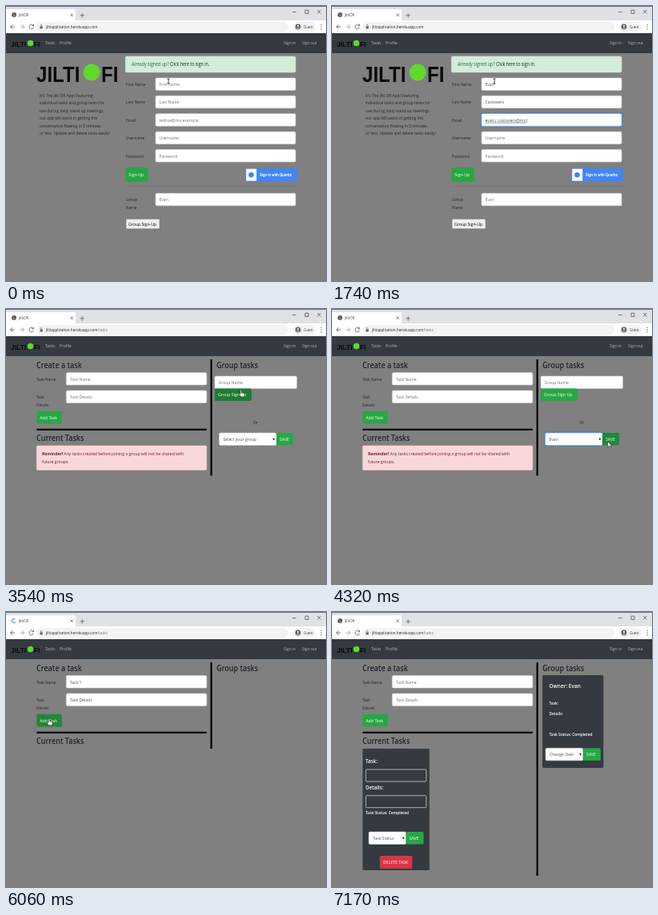
Animation, 400 px wide and 344 px high, one loop 7200 ms. Source, as an HTML page:

```html
<!DOCTYPE html>
<html lang="en">
<head>
<meta charset="utf-8">
<title>JiltiOfi</title>
<style>
  html, body { margin: 0; width: 100%; height: 100%; overflow: hidden; background: #808080; }
  svg { display: block; width: 100vw; height: 100vh; }
  text { font-family: "Open Sans", "Noto Sans", sans-serif; white-space: pre; }
</style>
</head>
<body>
<svg viewBox="0 0 400 344" preserveAspectRatio="none">
  <g id="chrome"></g>
  <g id="tab"></g>
  <g id="page"></g>
  <g id="pointer"></g>
</svg>
<script>
const LOOP = 7200;
const SQUEEZE = 0.86;
const INK = '#212529', GREEN = '#28a745', DARK = '#343a40', MUTED = '#6c757d';

// Drawing helpers: each returns SVG markup
const rect = (x, y, w, h, fill, extra = '') =>
  `<rect x="${x}" y="${y}" width="${w}" height="${h}" fill="${fill}" ${extra}/>`;
const line = (d, color, width = 0.8) =>
  `<path d="${d}" fill="none" stroke="${color}" stroke-width="${width}"/>`;
const text = (x, cy, str, { size = 5.9, fill = INK, weight = 400, extra = '' } = {}) =>
  `<text transform="translate(${x} ${cy + size * 0.34}) scale(${SQUEEZE} 1)"
    font-size="${size}" font-weight="${weight}" fill="${fill}" ${extra}>${str}</text>`;
const label = (x, cy, str) => text(x, cy, str, { size: 5.6 });
const heading = (x, cy, str) => text(x, cy, str, { size: 10.5, weight: 600 });
const button = (x, y, w, h, str, fill = GREEN, pad = 4) =>
  rect(x, y, w, h, fill, 'rx="1.5"') +
  text(x + pad, y + h / 2, str, { size: 6.1, fill: '#fff', weight: 500 });

function box(x, y, w, h, focus) {
  const glow = focus
    ? rect(x - 0.8, y - 0.8, w + 1.6, h + 1.6, 'none', 'rx="2" stroke="#007bff" stroke-opacity=".45" stroke-width="1.2"')
    : '';
  return glow + rect(x, y, w, h, '#fff', `rx="1.6" stroke="${focus ? '#80bdff' : '#ced4da'}" stroke-width=".6"`);
}

function input(x, y, w, hint, value = '', focus = false, decor = '') {
  const caret = value && focus ? '<tspan fill="#000" text-decoration="none">|</tspan>' : '';
  return box(x, y, w, 15.5, focus) +
    text(x + 4.5, y + 8, value ? `<tspan ${decor}>${value}</tspan>${caret}` : hint,
      { fill: value ? '#495057' : MUTED });
}

const select = (x, y, w, str, focus) =>
  box(x, y, w, 15.5, focus) +
  text(x + 5, y + 8, str, { fill: '#495057' }) +
  `<path d="M${x + w - 4.6} ${y + 6.8}h2.8l-1.4 2.6z" fill="#222"/>`;

const popup = (x, y, w, rows, active, step = 12) =>
  rect(x, y, w, rows.length * step, '#fff', 'stroke="#767676" stroke-width=".5"') +
  rows.map((row, i) =>
    (i === active ? rect(x, y + i * step, w, step, '#1e90ff') : '') +
    text(x + 5, y + (i + 0.5) * step, row, { fill: i === active ? '#fff' : '#495057' })).join('');

const wordmark = () => {
  const style = { size: 28, weight: 700, fill: '#0b0b0b', extra: 'style="font-family:\'Liberation Sans\',sans-serif"' };
  return text(38, 85, 'JILTI', style) +
    '<circle cx="107" cy="83" r="10.5" fill="#5fd92c"/>' +
    text(119, 85, 'FI', style);
};

// Timing helpers
const within = (t, a, b) => t >= a && t < b;
const typed = (str, t, a, b) =>
  str.slice(0, Math.max(0, Math.min(str.length, Math.floor((t - a) / (b - a) * str.length))));
const LOADS = [[3060, 3300], [4530, 4800], [6030, 6210], [6810, 7080]];
const PAGE = { tasks: 3120, joined: 4590, added: 6090, saved: 6870 };

// Form fields: row y, label, hint, value, typing start and end
const FIELDS = [
  [90, 'First Name', 'First Name', 'Evan', 150, 390],
  [112.3, 'Last Name', 'Last Name', 'Castovero', 480, 930],
  [134.7, 'Email', 'tedroe@mx.example', 'evan.r.castovero@mx.example', 1020, 2010],
  [157.2, 'Username', 'Username', 'ecastovero1', 2040, 2340],
  [179.6, 'Password', 'Password', 'password', 2400, 2700]
];
const INTRO = [
  "It's The Jilti Ofi App! Featuring", 'individual tasks and group tasks for',
  'use during daily stand up meetings,', 'our app will assist in getting the',
  'conversation flowing in 5 minutes', 'or less. Update and delete tasks easily!'
];

function browser() {
  const grey = '#5f6368';
  const nav = (x, str) => text(x, 46.5, str, { size: 5.8, fill: '#b3b6b9' });
  return rect(0, 0, 400, 19, '#dee1e6') + rect(0, 0, 400, 1, '#6f6690') +
    '<path d="M0 19V4H85q2 0 2 2V19z" fill="#fff"/>' +
    text(16, 11.3, 'JiltiOfi', { size: 5.2, fill: '#3c4043' }) +
    line('M80.5 9.5l3.4 3.6m0-3.6l-3.4 3.6M92.5 11.8h5.4m-2.7-2.8v5.6', grey) +
    line('M358 7.5h4.5M374 5.2h4v4.2h-4zM389.3 5l4 4.4m0-4.4l-4 4.4', '#444', 0.7) +
    rect(0, 18, 400, 16, '#fff') +
    line('M10.8 26H5.6m2.6-2.8L5.6 26l2.6 2.8', grey, 0.9) +
    line('M17.5 26h5.2m-2.6-2.8l2.6 2.8-2.6 2.8', '#a5a8ab', 0.9) +
    line('M33.8 24.2a2.7 2.9 0 1 0 .5 2.5M34.4 22.6v2.2h-2.2', grey, 0.9) +
    rect(38, 20, 315, 12, '#f1f3f4', 'rx="6"') +
    rect(42.5, 25.4, 3.2, 3, grey) + line('M43.2 25.5v-1.2a.9 1 0 0 1 1.8 0v1.2', grey, 0.6) +
    rect(359, 20, 28, 12, '#f1f3f4', 'rx="6"') +
    `<circle cx="365" cy="26" r="3.4" fill="${grey}"/><circle cx="365" cy="25" r="1.1" fill="#fff"/>` +
    '<path d="M363 28.3q2-2.2 4 0z" fill="#fff"/>' +
    text(372, 26, 'Guest', { size: 5, fill: '#3c4043' }) +
    [23.2, 26, 28.8].map(y => `<circle cx="394" cy="${y}" r=".7" fill="${grey}"/>`).join('') +
    rect(0, 34, 400, 25, DARK) + rect(0, 59, 400, 285, '#808080') +
    `<g transform="translate(-7.5 17) scale(.355)">${wordmark()}</g>` +
    nav(49, 'Tasks') + nav(67, 'Profile') + nav(347, 'Sign in') + nav(370, 'Sign out');
}

function tabState(t) {
  const busy = LOADS.some(([a, b]) => within(t, a, b));
  const icon = busy
    ? `<circle cx="10" cy="11" r="2.6" fill="none" stroke="#1a73e8" stroke-width=".9"
        stroke-dasharray="11 6" transform="rotate(${t * 0.6 % 360} 10 11)"/>`
    : '<circle cx="10" cy="11" r="2.9" fill="#4a4d51"/>' + line('M8 9.6q1.5 1 2.2-.4M9 13.2q.4-1.6 2.6-1.2', '#fff', 0.6);
  const path = t >= PAGE.tasks ? '<tspan fill="#777">/tasks</tspan>' : '';
  return icon + text(50, 26, 'jiltiapplication.herokuapp.com' + path, { size: 5.3 });
}

function signUp(t) {
  let out = wordmark() +
    INTRO.map((row, i) => text(42, 112 + i * 9.4, row, { size: 5.7 })).join('') +
    rect(149.3, 63, 212.7, 20, '#d4edda', 'rx="1.6" stroke="#c3e6cb" stroke-width=".6"') +
    text(157, 73, 'Already signed up? <tspan fill="#0b2e13" font-weight="500">Click here to sign in.</tspan>',
      { size: 6.2, fill: '#2d6a3b' });
  FIELDS.forEach(([y, name, hint, value, a, b], i) => {
    const next = FIELDS[i + 1] ? FIELDS[i + 1][4] - 60 : 3030;
    const focus = within(t, a - 60, next);
    const decor = i === 2 && focus ? 'text-decoration="underline"' : '';
    out += label(150, y + 8, name) + input(187, y, 175, hint, typed(value, t, a, b), focus, decor);
  });
  return out + button(149.3, 202, 28.5, 18, 'Sign-Up', within(t, 2970, 3120) ? '#218838' : GREEN) +
    rect(299.5, 203, 64.5, 16.5, '#4285f4', 'rx=".8"') + rect(300.2, 203.7, 13, 15, '#fff') +
    '<circle cx="306.5" cy="211.2" r="3.3" fill="#4285f4"/>' +
    text(317, 211.2, 'Sign in with Quorbo', { size: 5.3, fill: '#fff', weight: 700, extra: 'style="font-family:Roboto,sans-serif"' }) +
    rect(149.3, 225.3, 214.7, 0.6, '#737373') +
    label(150, 242, 'Group') + label(150, 252, 'Name') + input(187, 234.3, 175, 'Evan') +
    rect(150, 266.3, 42, 12.5, '#efefef', 'stroke="#767676" stroke-width=".6"') +
    text(153, 272.6, 'Group Sign-Up', { size: 6, fill: '#000' });
}

function joinForm(t) {
  const hover = within(t, 3450, 3750);
  const open = within(t, 3870, 4140);
  const chosen = t >= 4140;
  return rect(38.3, 171, 212.5, 30.5, '#f8d7da', 'rx="1.6" stroke="#f5c6cb" stroke-width=".6"') +
    text(45, 181.3, '<tspan font-weight="700">Reminder!</tspan> Any tasks created before joining a group will not be shared with', { fill: '#721c24' }) +
    text(45, 190.7, 'future groups.', { fill: '#721c24' }) +
    input(261, 84, 102.5, 'Group Name') +
    button(261, 99.5, 46, 15.5, 'Group Sign Up', hover ? '#1e7e34' : GREEN) +
    text(309, 142, 'Or', { weight: 500 }) +
    select(266.5, 155, 71.5, chosen ? 'Evan' : 'Select your group', within(t, 3870, 4380)) +
    button(338, 155, 21, 15.5, 'SAVE', within(t, 4320, 4590) ? '#218838' : GREEN) +
    (open ? popup(266.5, 171, 71.5, ['Select your group', 'Evan'], t < 4020 ? 0 : 1) : '');
}

function cards(t) {
  const saved = t >= PAGE.saved;
  const white = (x, cy, str, size = 5.6, weight = 600) => text(x, cy, str, { size, weight, fill: '#fff' });
  const slot = (y, str) =>
    rect(42.3, y, 75.5, 15, DARK, 'rx="1" stroke="#dfe2e5" stroke-width=".7"') + white(47, y + 7.6, str, 5.8, 400);
  const status = 'Task Status:' + (saved ? ' Completed' : '');
  const shift = saved ? -10 : 0;
  const done = !saved && t >= 6510;
  const hover = within(t, 6690, PAGE.saved);
  return rect(38.3, 171, 83.5, 152, DARK, 'rx="1.6"') +
    white(42, 187, 'Task:', 7.2) + slot(197, saved ? '' : 'Task 1') +
    white(42, 220, 'Details:', 7.2) + slot(229.7, saved ? '' : 'Task Details') +
    white(42, 251.3, status) +
    select(46, 275, 46.5, done ? 'Completed' : 'Task Status', within(t, 6360, 6750)) +
    button(92.5, 275, 22, 15.5, 'SAVE', hover ? '#218838' : GREEN) +
    button(59.7, 305, 40.5, 16, 'DELETE TASK', '#dc3545') +
    (within(t, 6360, 6510) ? popup(46, 291, 46.5, ['Task Status', 'In Progress', 'Completed'], t < 6420 ? 0 : t < 6460 ? 1 : 2) : '') +
    rect(263, 79, 76.3, 126 + shift, DARK, 'rx="1.6"') +
    white(271.5, 92, 'Owner: Evan', 7.5) +
    white(271.5, 114.5, saved ? 'Task:' : 'Task: Task 1') + white(271.5, 127.3, 'Details:') +
    (saved ? '' : white(271.5, 141, 'Task Details', 5.6, 400)) +
    white(271.5, 163.5 + shift, status) +
    select(267, 180.3 + shift, 46.8, 'Change Own') +
    button(313.8, 180.3 + shift, 22, 15.5, 'SAVE');
}

function tasks(t) {
  const adding = t < PAGE.added;
  const name = adding ? typed('Task 1', t, 5040, 5280) : '';
  const details = adding ? typed('Task Details', t, 5370, 5760) : '';
  const bottom = t < PAGE.joined ? 208.5 : adding ? 171 : 330;
  return heading(38, 70.3, 'Create a task') + heading(263, 70.3, 'Group tasks') +
    label(38, 88, 'Task Name') + input(75.3, 79.5, 175.5, 'Task Name', name, within(t, 4980, 5310)) +
    label(38, 110, 'Task') + label(38, 120, 'Details') +
    input(75.3, 102, 175.5, 'Task Details', details, within(t, 5310, 5880)) +
    button(38.3, 127.7, 31.5, 15.8, 'Add Task', within(t, 5940, 6180) ? '#218838' : GREEN) +
    rect(38.3, 149.7, 212.5, 2.2, '#000') + heading(38, 161.5, 'Current Tasks') +
    rect(255.5, 63, 2.2, bottom - 63, '#000') +
    (t < PAGE.joined ? joinForm(t) : adding ? '' : cards(t));
}

// Pointer stops: time, x, y, shape from that time on
const STOPS = [
  [0, 203, 94, 'beam'], [2790, 203, 94, 'arrow'], [3000, 163, 212, 'hand'], [3120, 163, 212, 'busy'],
  [3300, 180, 205, 'arrow'], [3480, 294, 105, 'hand'], [3690, 294, 105, 'arrow'], [3840, 300, 163, 'arrow'],
  [3930, 300, 163, 'arrow'], [4080, 300, 188, 'arrow'], [4170, 300, 188, 'arrow'], [4350, 348, 164, 'hand'],
  [4560, 348, 164, 'busy'], [4860, 95, 85, 'busy'], [4980, 95, 85, 'beam'], [5790, 95, 85, 'arrow'],
  [5970, 54, 137, 'hand'], [6090, 54, 137, 'busy'], [6210, 54, 137, 'arrow'], [6330, 70, 284, 'arrow'],
  [6390, 70, 284, 'arrow'], [6480, 72, 324, 'busy'], [6570, 72, 324, 'arrow'], [6720, 103, 284, 'hand'],
  [6840, 103, 284, 'busy'], [6990, 103, 284, 'none'], [LOOP, 103, 284, 'none']
];
const ARROW = '<path d="M0 0V7l1.6-1.5L2.7 8l1.1-.5-1.1-2.3H5z" fill="#fff" stroke="#111" stroke-width=".5"/>';
const SHAPES = {
  none: () => '',
  arrow: () => ARROW,
  beam: () => line('M-1.5-3.2Q0-3.2 0-2.4V2.4Q0 3.2-1.5 3.2M1.5-3.2Q0-3.2 0-2.4M0 2.4Q0 3.2 1.5 3.2', '#111', 0.8),
  hand: () => '<path d="M-1-3.4q.8-.8 1.5 0V-.2l3 .7q.8.3.7 1.2L3.6 4.8H-.4L-2.8 1.6q0-1 1.8-.2z" fill="#fff" stroke="#111" stroke-width=".5"/>',
  busy: t => ARROW + `<circle r="4" fill="none" stroke="#7fd3f0" stroke-width="1.5"/>
    <circle r="4" fill="none" stroke="#1492cc" stroke-width="1.5" stroke-dasharray="14 12" transform="rotate(${t * 0.5 % 360})"/>`
};

function pointer(t) {
  const i = STOPS.findIndex((s, k) => k + 1 < STOPS.length && t < STOPS[k + 1][0]);
  const [t0, x0, y0, shape] = STOPS[i], [t1, x1, y1] = STOPS[i + 1];
  const u = (t - t0) / (t1 - t0), e = u * u * (3 - 2 * u);
  return `<g transform="translate(${x0 + (x1 - x0) * e} ${y0 + (y1 - y0) * e})">${SHAPES[shape](t)}</g>`;
}

const shown = {};
function put(id, markup) {
  if (shown[id] === markup) return;
  shown[id] = markup;
  document.getElementById(id).innerHTML = markup;
}

const start = performance.now();
function draw(now) {
  const t = Math.max(0, now - start) % LOOP;
  put('tab', tabState(t));
  put('page', t < PAGE.tasks ? signUp(t) : tasks(t));
  put('pointer', pointer(t));
  requestAnimationFrame(draw);
}
put('chrome', browser());
draw(start);
</script>
</body>
</html>
```
